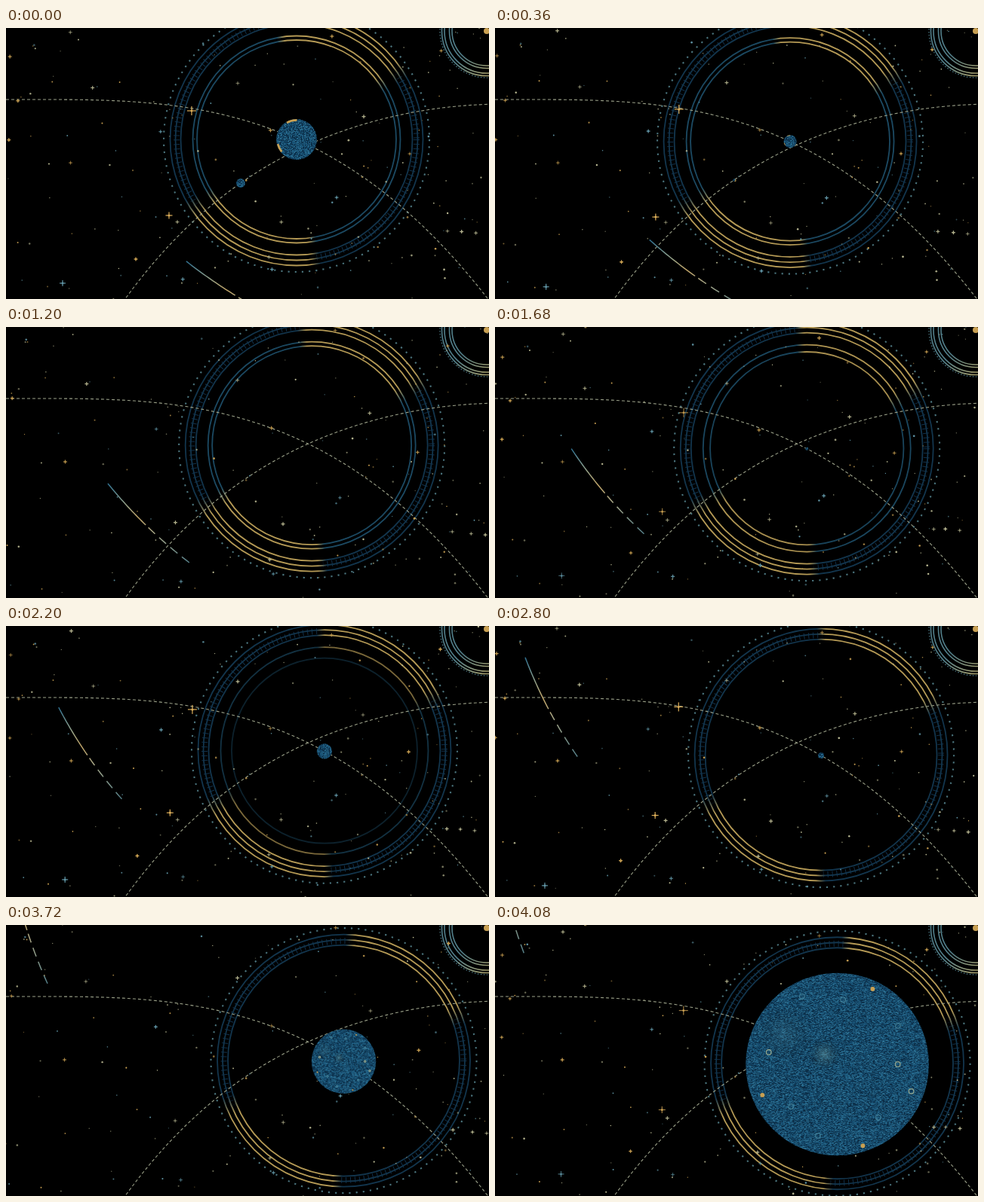
An HTML page with a canvas for the animation above (4.12 s loop, 640 by 360 pixels).

```html
<!DOCTYPE html>
<html>
<head>
<meta charset="utf-8">
<style>
html, body { margin: 0; width: 100%; height: 100%; overflow: hidden; background: #000; }
canvas { display: block; }
</style>
</head>
<body>
<canvas id="stage" width="640" height="360"></canvas>
<script>
const ctx = document.getElementById('stage').getContext('2d');
const LOOP = 4.12, TAU = Math.PI * 2;
const GOLD = '#c9a052', PALE = '#b9b892', BLUE = '#5f93a3';
const OLIVE = '#b59a55', DEEP = '#12354d', TEAL = '#1b4962';

let seed = 7;
const rand = () => (seed = (seed * 16807) % 2147483647) / 2147483647;
const pick = list => list[Math.floor(rand() * list.length)];
const clamp = v => Math.max(0, Math.min(1, v));

// Star places are relative to the centre of the stage; near stars spread faster.
const stars = Array.from({ length: 190 }, () => ({
  x: rand() * 680 - 340,
  y: rand() * 390 - 195,
  rate: 0.02 + rand() * 0.025,
  size: 1.3 + rand() ** 2 * 1.5,
  arm: rand() < 0.12 ? 2.5 : 0,
  color: pick([GOLD, PALE, PALE, BLUE])
}));
const nearStar = (x, y, arm, color) =>
  stars.push({ x: x - 320, y: y - 180, rate: 0.082, size: 3, arm, color, near: true });
nearStar(246, 110, 6, '#dcae5a');
nearStar(216, 249, 4.5, '#dcae5a');
nearStar(75, 339, 4, BLUE);
nearStar(172, 307, 2.5, GOLD);

// Speckled surface for the planet
const skin = document.createElement('canvas');
skin.width = skin.height = 280;
const skinCtx = skin.getContext('2d');
const blues = ['#0b2c45', '#134567', '#1a587c', '#2d7294'];
for (let i = 0; i < 280 * 280; i++) {
  skinCtx.fillStyle = blues[Math.floor(rand() ** 1.2 * 4)];
  skinCtx.fillRect(i % 280, Math.floor(i / 280), 1, 1);
}

function disc(x, y, r, color) {
  ctx.fillStyle = color;
  ctx.beginPath();
  ctx.arc(x, y, r, 0, TAU);
  ctx.fill();
}

function arc(x, y, r, color, width, from = 0, to = TAU) {
  ctx.strokeStyle = color;
  ctx.lineWidth = width;
  ctx.beginPath();
  ctx.arc(x, y, r, from, to);
  ctx.stroke();
}

function dashed(pattern, draw) {
  ctx.setLineDash(pattern);
  draw();
  ctx.setLineDash([]);
}

function plot(point, from, to, step) {
  ctx.beginPath();
  for (let u = from; u < to; u += step) ctx.lineTo(...point(u));
  ctx.lineTo(...point(to));
  ctx.stroke();
}

const fallY = x => 95 + 2.06e-6 * Math.max(0, x - 40) ** 2.92;
const riseY = x => {
  const d = Math.max(0, 660 - x);
  return 101 + 7.5e-4 * d * d + 4.9e-11 * d ** 4.5;
};

function drawOrbits() {
  ctx.strokeStyle = '#9ba189';
  ctx.lineWidth = 1.1;
  dashed([4, 3], () => {
    plot(x => [x, fallY(x)], 0, 640, 5);
    plot(x => [x, riseY(x)], 155, 640, 5);
  });
}

function drawStars(t) {
  const period = 2.36, lead = 0.75;
  const phase = (t + lead) % period - lead;
  const nearGlow = clamp((phase + 1) / 0.5) * clamp((1.2 - phase) / 0.2);
  stars.forEach((s, i) => {
    const k = Math.exp(s.rate * phase);
    const x = 320 + s.x * k, y = 180 + s.y * k;
    ctx.globalAlpha = s.near ? nearGlow : 0.75 + 0.25 * Math.sin(t * 4 + i * 2.4);
    disc(x, y, s.size / 2, s.color);
    if (s.arm) {
      ctx.fillRect(x - s.arm, y - 0.6, s.arm * 2, 1.2);
      ctx.fillRect(x - 0.6, y - s.arm, 1.2, s.arm * 2);
    }
  });
  ctx.globalAlpha = 1;
}

// Two opposite lit arcs turn slowly around the ring.
function litStroke(x, y, angle, lit, dark) {
  const g = ctx.createConicGradient(angle, x, y);
  for (const half of [0, 0.5]) {
    g.addColorStop(half, dark);
    g.addColorStop(half + 0.012, lit);
    g.addColorStop(half + 0.175, lit);
    g.addColorStop(half + 0.2, dark);
  }
  g.addColorStop(1, dark);
  return g;
}

function drawRing(t, x, y) {
  const angle = (79 + 3.2 * t) * Math.PI / 180;
  const band = (r, lit, dark) => arc(x, y, r, litStroke(x, y, angle, lit, dark), 1.8);
  dashed([2.2, 7.015], () => arc(x, y, 176, '#4a737c', 2.1));
  dashed([1, 5], () => arc(x, y, 159, litStroke(x, y, angle, 'transparent', '#10304a'), 8));
  for (const r of [167.5, 160.5, 153.5]) band(r, OLIVE, DEEP);

  const fade = clamp((2.7 - t) / 1.1);
  ctx.globalAlpha = Math.sqrt(fade);
  band(137.5, OLIVE, TEAL);
  ctx.globalAlpha = fade;
  band(132 - 9 * clamp((t - 1.3) / 0.9), t > 1.9 ? TEAL : OLIVE, TEAL);
  ctx.globalAlpha = 1;
}

function drawCorner() {
  const x = 637, y = 4;
  const g = ctx.createLinearGradient(580, 0, 640, 64);
  g.addColorStop(0.5, '#527f8a');
  g.addColorStop(0.95, '#a5a06f');
  dashed([1.5, 2.5], () => arc(x, y, 62, '#4f7f8c', 1.2));
  for (const r of [59.5, 56, 49.5, 46]) arc(x, y, r, g, 1.6);
  disc(x, y, 4, GOLD);
}

const cometAt = u => [239 - 98.4 * u + 9.77 * u * u, 310 - 77 * u - 6.69 * u * u];

function drawComet(t) {
  const [hx, hy] = cometAt(t), [tx, ty] = cometAt(t - 1.25);
  const g = ctx.createLinearGradient(hx, hy, tx, ty);
  g.addColorStop(0, '#2f7090');
  g.addColorStop(0.22, '#8fa08c');
  g.addColorStop(0.4, '#c0a468');
  g.addColorStop(0.6, '#a9a98a');
  g.addColorStop(1, '#55808a');
  ctx.strokeStyle = g;
  ctx.lineWidth = 1.5;
  plot(cometAt, t - 0.62, t, 0.03);
  for (let lag = 0.66; lag < 1.2; lag += 0.16) plot(cometAt, t - lag - 0.1, t - lag, 0.03);
}

// The planet shrinks away, swells once, then rushes closer.
const planetSize = t => 27 * Math.exp(-3.2 * t)
  + 9.5 * Math.exp(-(((t - 2.2) / 0.4) ** 2))
  + 121 * Math.exp(2.9 * (t - 4.08));

function globe(x, y, r) {
  ctx.save();
  ctx.beginPath();
  ctx.arc(x, y, r, 0, TAU);
  ctx.clip();
  ctx.drawImage(skin, x - 140, y - 140);
  ctx.restore();
}

function patch(x, y, r, color) {
  const g = ctx.createRadialGradient(x, y, 0, x, y, r);
  g.addColorStop(0, color);
  g.addColorStop(1, 'transparent');
  disc(x, y, r, g);
}

function drawPlanet(t, x, y) {
  const r = planetSize(t);
  if (r < 0.8) return;
  globe(x, y, r);
  if (r > 40) {
    patch(x - 0.58 * r, y - 0.33 * r, 0.3 * r, 'rgba(75,140,165,.3)');
    patch(x - 0.14 * r, y - 0.11 * r, 0.18 * r, 'rgba(120,175,180,.45)');
    for (let i = 0; i < 12; i++) {
      const a = i * 2.4, d = r * (0.66 + 0.025 * i);
      const cx = x + d * Math.cos(a), cy = y + d * Math.sin(a);
      if (i > 8) disc(cx, cy, 0.024 * r, GOLD);
      else arc(cx, cy, 0.027 * r, i % 4 ? '#3f7d96' : '#96a88f', 1.2);
    }
  } else if (t > 3) {
    disc(x - 0.45 * r, y - 0.3 * r, 0.22 * r, GOLD);
  } else if (t < 0.5) {
    arc(x, y, r * 0.95, GOLD, r * 0.1, -2.1, -1.55);
    arc(x, y, r * 0.95, GOLD, r * 0.1, 2.45, 2.9);
  }
}

function drawMoon(t) {
  const x = 311 + 16 * t;
  globe(x, riseY(x), 6 * clamp(1 - t / 0.5));
}

function frame(now) {
  const t = (now / 1000) % LOOP;
  const x = 385 + 16.8 * t, y = fallY(x);
  ctx.fillStyle = '#000';
  ctx.fillRect(0, 0, 640, 360);
  drawRing(t, x, y - 0.3 * t);
  drawCorner();
  drawOrbits();
  drawStars(t);
  drawComet(t);
  drawPlanet(t, x, y);
  drawMoon(t);
  requestAnimationFrame(frame);
}
requestAnimationFrame(frame);
</script>
</body>
</html>
```
